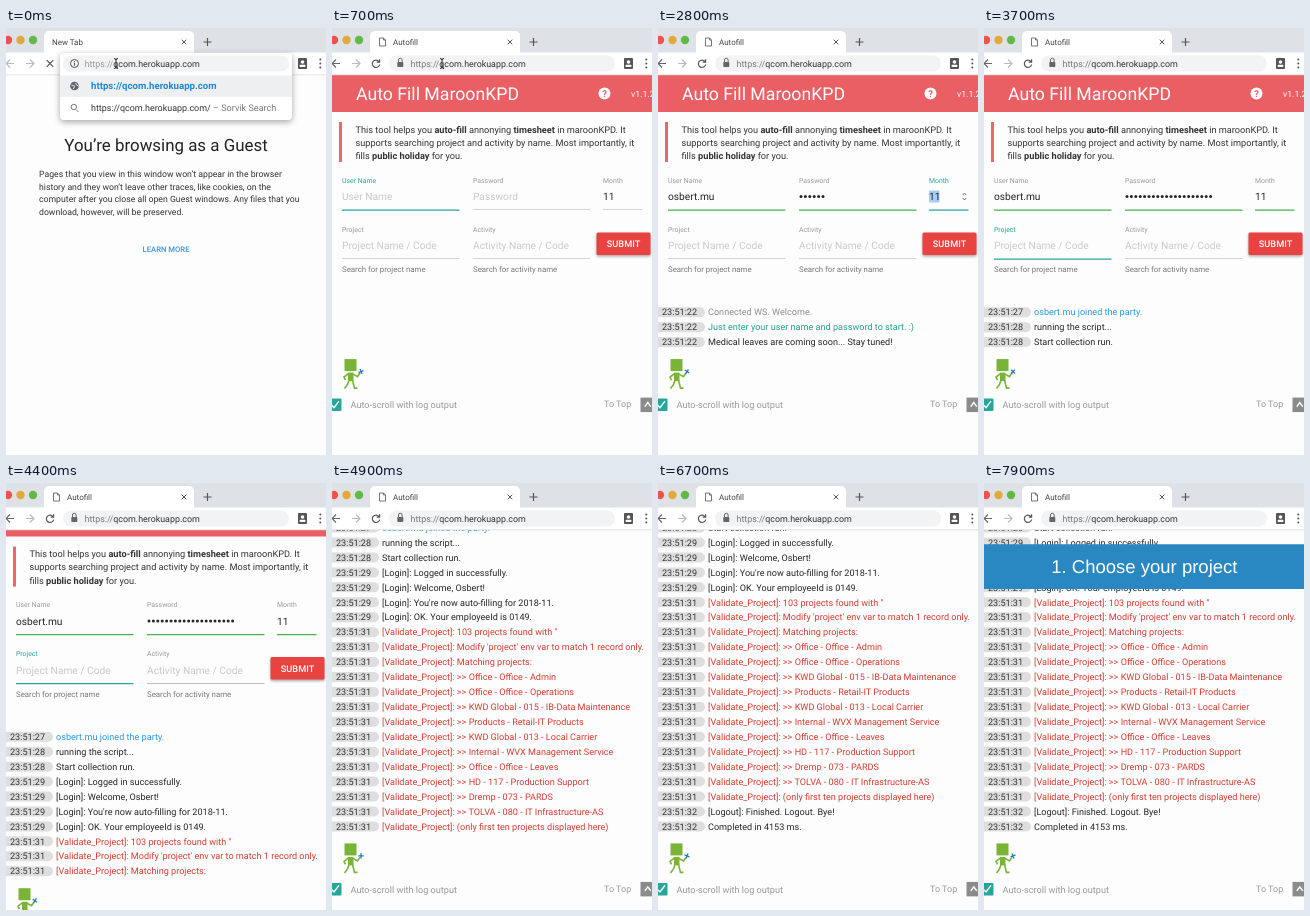
These frames come from a looping animation (320 px wide and 427 px high, 8000 ms). An HTML page with a canvas:

```html
<!DOCTYPE html>
<html lang="en">
<head>
<meta charset="utf-8">
<title>Autofill</title>
<style>
html, body { margin: 0; width: 100%; height: 100%; overflow: hidden; background: #fdfdfd; }
canvas { display: block; width: 100vw; height: 100vh; }
</style>
</head>
<body>
<canvas id="stage"></canvas>
<script>
const W = 320, H = 427, LOOP = 8000;
const LINE = 14.94, FIRST = 284.2, BOTTOM = 343.4;
const TEAL = '#26a69a', GREEN = '#4caf50', RED = '#d63a30', INK = '#262626', GRAY = '#999', BLUE = '#2a98dc';
const URL_HOST = 'qcom.herokuapp.com', USER = 'osbert.mu';

// Key moments, in ms
const CLOSE_MENU = 250, LOAD = 700, CONNECT = 1000, HIDE_MOUSE = 1500, TYPE_USER = 1500,
  FOCUS_PASS = 2100, FOCUS_MONTH = 2700, SUBMIT = 3100, JOIN = 3200, BANNER = 6700;

const welcome = [
  ['22', '#8e8e8e', 'Connected WS. Welcome.'],
  ['22', '#26a08a', 'Just enter your user name and password to start. :)'],
  ['22', INK, 'Medical leaves are coming soon... Stay tuned!']
];
const check = (time, text) => [time, '31', RED, '[Validate_Project]: ' + text];
const login = (time, text) => [time, '29', INK, '[Login]: ' + text];
const log = [
  [JOIN, '27', BLUE, USER + ' joined the party.'],
  [3400, '28', INK, 'running the script...'],
  [3500, '28', INK, 'Start collection run.'],
  login(3900, 'Logged in successfully.'),
  login(3950, 'Welcome, Osbert!'),
  login(4000, "You're now auto-filling for 2018-11."),
  login(4050, 'OK. Your employeeId is 0149.'),
  check(4400, "103 projects found with ''"),
  check(4400, "Modify 'project' env var to match 1 record only."),
  check(4400, 'Matching projects:'),
  ...['Office - Office - Admin', 'Office - Office - Operations', 'KWD Global - 015 - IB-Data Maintenance',
    'Products - Retail-IT Products', 'KWD Global - 013 - Local Carrier', 'Internal - WVX Management Service',
    'Office - Office - Leaves', 'HD - 117 - Production Support', 'Dremp - 073 - PARDS',
    'TOLVA - 080 - IT Infrastructure-AS'].map((p, i) => check(4420 + i * 15, '>> ' + p)),
  check(4580, '(only first ten projects displayed here)'),
  [5500, '32', INK, '[Logout]: Finished. Logout. Bye!'],
  [5500, '32', INK, 'Completed in 4153 ms.']
];

const canvas = document.getElementById('stage'), c = canvas.getContext('2d');
const clamp = v => Math.max(0, Math.min(1, v));
const ease = v => { v = clamp(v); return v * v * (3 - 2 * v); };

function text(s, x, y, size, color, weight = 400, align = 'left', family = 'Roboto') {
  c.font = `${weight} ${size}px ${family}, sans-serif`;
  c.fillStyle = color;
  c.textAlign = align;
  c.fillText(s, x, y);
  return x + c.measureText(s).width;
}
// Text with **bold** runs
function rich(s, x, y, size, color) {
  s.split('**').forEach((part, i) => { x = text(part, x, y, size, color, i % 2 ? 700 : 400); });
}
function rect(x, y, w, h, color, r = 0) {
  c.fillStyle = color;
  c.beginPath();
  c.roundRect(x, y, w, h, r);
  c.fill();
}
function disc(x, y, r, color) {
  c.fillStyle = color;
  c.beginPath();
  c.arc(x, y, r, 0, 7);
  c.fill();
}
function path(d, color, width = 1.2, x = 0, y = 0) {
  c.save();
  c.translate(x, y);
  c.strokeStyle = color;
  c.lineWidth = width;
  c.stroke(new Path2D(d));
  c.restore();
}
function shadow(blur, y, draw) {
  c.save();
  c.shadowColor = 'rgba(0,0,0,.35)';
  c.shadowBlur = blur * canvas.width / W;
  c.shadowOffsetY = y * canvas.height / H;
  draw();
  c.restore();
}

function drawTabs(loaded) {
  rect(0, 0, W, 25, '#dee1e6');
  rect(38, 3, 150, 30, '#fff', 5);
  rect(0, 24.5, W, 22.5, '#fff');
  [['#e9544e', 2], ['#e0ab3c', 14.5], ['#62b946', 27]].forEach(([color, x]) => disc(x, 12, 4.2, color));
  if (loaded) path('M-3-4H1L3-2V4H-3ZM1-4V-2H3', '#666', 0.9, 50.5, 14);
  text(loaded ? 'Autofill' : 'New Tab', loaded ? 61 : 46, 17, 8, '#444');
  path('M-2.3-2.3L2.3 2.3M2.3-2.3L-2.3 2.3', '#555', 1, 178, 14);
  path('M-4 0H4M0-4V4', '#555', 1.2, 201.5, 14);
  path('M4 0H-4M0-4L-4 0L0 4', loaded ? '#666' : '#bbb', 1.2, 4, 35.5);
  path('M-4 0H4M0-4L4 0L0 4', '#bbb', 1.2, 24, 35.5);
  if (loaded) {
    path('M3 -2A3.7 3.7 0 1 0 3.7 1M3.6-4.3V-1.4H.7', '#555', 1.2, 44, 35.5);
  } else {
    path('M-3.3-3.3L3.3 3.3M3.3-3.3L-3.3 3.3', '#555', 1.2, 44, 35.5);
  }
  rect(292, 30, 9, 11, '#555', 1);
  disc(296.5, 34, 1.8, '#fff');
  rect(293.5, 36.8, 6, 2.2, '#fff', 1);
  [31.5, 35.5, 39.5].forEach(y => disc(314.3, y, 1, '#555'));
}

function drawAddress(loaded, menu) {
  if (menu) {
    shadow(6, 2, () => rect(54, 25, 232, 67, '#fff', 4));
    rect(54, 47.5, 232, 21.5, '#eeeff0');
    disc(68.5, 58, 4.3, '#5f6368');
    path('M-3-1L0 0L-1 3M1-3L2-1L4 0', '#eee', 1, 68.5, 58);
    text('https://' + URL_HOST, 85, 61.2, 9.65, '#1f87d2', 700);
    path('M1.5 1.5L4 4M2-1A2.7 2.7 0 1 1-3.4-1A2.7 2.7 0 1 1 2-1', '#777', 1, 68.5, 80);
    const x = text('https://' + URL_HOST + '/', 85, 83, 8.95, '#333');
    text(' – Sorvik Search', x, 83, 9.1, '#777');
  }
  rect(57, 27.5, 226, 16, '#f1f3f4', 8);
  if (loaded) {
    rect(65.3, 34, 6, 5, '#666', 0.7);
    path('M-1.8 0V-2A1.8 1.8 0 0 1 1.8-2V0', '#666', 1, 68.3, 34);
  } else {
    path('M4 0A4 4 0 1 1-4 0A4 4 0 1 1 4 0M0-.7V2.2M0-2.3V-1.3', '#555', 1, 68.5, 35.5);
  }
  const x = text('https://', 78.5, 38.7, 8.9, loaded ? '#777' : '#999');
  text(URL_HOST, x, 38.7, 8.9, '#333');
}

function drawGuest() {
  text('You’re browsing as a Guest', 160, 123, 16.9, '#222', 400, 'center');
  ['Pages that you view in this window won’t appear in the browser',
    'history and they won’t leave other traces, like cookies, on the',
    'computer after you close all open Guest windows. Any files that you',
    'download, however, will be preserved.'
  ].forEach((s, i) => text(s, 33, 149.3 + i * 12.5, 8.7, '#333'));
  text('LEARN MORE', 160, 224, 7.7, '#3c93d6', 500, 'center');
}

function drawField(x, y, w, label, value, hint, state) {
  const focus = state === 'focus';
  text(label, x, y - 27.5, 6.9, focus ? TEAL : GRAY);
  text(value || hint, x, y - 10, 10.2, value ? INK : '#c9c9c9');
  const color = focus ? TEAL : state === 'valid' ? GREEN : '#aaa';
  rect(x, y - 0.6, w, state ? 1.4 : 0.7, color);
}

function drawForm(t) {
  rect(0, 47, W, 37, '#ea5f63');
  text('Auto Fill MaroonKPD', 24, 71.5, 17.7, '#fff');
  disc(272.5, 65.5, 6, '#fff');
  text('?', 272.5, 69, 9.5, '#ea5f63', 700, 'center');
  text('v1.1.2', 299, 69, 8.7, '#fff');

  rect(7, 94, 3, 40, '#e8686b');
  ['This tool helps you **auto-fill** annonying **timesheet** in maroonKPD. It',
    'supports searching project and activity by name. Most importantly, it',
    'fills **public holiday** for you.'
  ].forEach((s, i) => rich(s, 23.5, 104.5 + i * 13.3, 9.2, '#333'));

  const focus = t < FOCUS_PASS ? 0 : t < FOCUS_MONTH ? 1 : t < SUBMIT ? 2 : 3;
  const state = i => focus === i ? 'focus' : focus > i ? 'valid' : '';
  const typed = Math.floor(Math.max(0, t - TYPE_USER) / 60);
  const dots = t >= SUBMIT ? 20 : Math.floor(6 * clamp((t - FOCUS_PASS) / 480));
  drawField(10, 182, 117.5, 'User Name', USER.slice(0, typed), 'User Name', state(0));
  drawField(141, 182, 117.5, 'Password', '', dots ? '' : 'Password', state(1));
  for (let i = 0; i < dots; i++) disc(143 + i * 4.4, 168.5, 1.5, INK);
  if (focus === 2) {
    rect(271, 162.5, 10.5, 12, '#a9cdf2');
    path('M-1.7-1.5L0-3.5L1.7-1.5M-1.7 1.5L0 3.5L1.7 1.5', '#777', 1, 306.5, 168.5);
  }
  drawField(271, 182, 39.5, 'Month', '11', '', state(2));
  drawField(10, 231, 117.5, 'Project', '', 'Project Name / Code', state(3));
  drawField(141, 231, 117.5, 'Activity', '', 'Activity Name / Code', '');
  text('Search for project name', 10, 244, 7.85, '#777');
  text('Search for activity name', 141, 244, 7.85, '#777');
  shadow(3, 1.5, () => rect(264.5, 204.5, 54, 22.5, '#e84341', 1.5));
  text('SUBMIT', 291.5, 219, 9.2, '#fff', 500, 'center');
}

function drawLine([stamp, color, s], y) {
  rect(-8, y - 5, 55, 10, '#dedede', 5);
  text('23:51:' + stamp, 4, y + 3.2, 9.1, '#333');
  text(s, 50, y + 3.2, 9.1, color);
}

function drawFooter(t, y) {
  c.save();
  c.translate(0, y);
  const green = '#7ab436';
  rect(12.5, 17, 12, 12, green);
  rect(16, 30.5, 5.5, 8.5, green);
  path('M16.5 31.5L12 35L13.5 38M21 32L25.5 34.5L28 31M17 38L15.5 42.5L12.5 46.5M20.5 38L22.5 46H25.5', green, 1.6);
  c.translate(29, 29.5);
  c.rotate((t - 500) / 800 * Math.PI / 2);
  path('M-1.9-1.9L1.9 1.9M1.9-1.9L-1.9 1.9', '#2379bd', 1.3);
  c.restore();

  const mid = y + 62.5;
  rect(-3, mid - 6, 12.5, 12.5, TEAL, 1);
  path('M-1 0L2 3L7-3.5', '#fff', 1.4, 0, mid);
  text('Auto-scroll with log output', 18.5, mid + 3.8, 9.15, GRAY);
  text('To Top', 272, mid + 2.8, 9, GRAY);
  rect(308.5, mid - 7, 14, 14.5, '#8b8b8b');
  path('M-3 2L0-2L3 2', '#fff', 1.5, 315.8, mid);
}

function drawPage(t) {
  const lines = t < JOIN ? (t < CONNECT ? [] : welcome) : log.filter(l => t >= l[0]).map(l => l.slice(1));
  const last = FIRST + (Math.max(3, lines.length) - 1) * LINE;
  const shown = t < JOIN ? 3 : log.reduce((n, l) => n + ease((t - l[0]) / 200), 0);
  const scroll = Math.max(0, FIRST + (shown - 1) * LINE - BOTTOM);
  c.save();
  c.beginPath();
  c.rect(0, 47, W, H);
  c.clip();
  c.translate(0, -scroll);
  drawForm(t);
  lines.forEach((line, i) => drawLine(line, FIRST + i * LINE));
  drawFooter(t, last);
  c.restore();
}

function drawBanner(t) {
  c.save();
  c.globalAlpha = ease((t - BANNER) / 400);
  rect(0, 61.3, W, 44.7, '#2988c2');
  text('1. Choose your project', 67.3, 90, 18.5, '#fff', 400, 'left', 'Liberation Sans');
  c.restore();
}

function draw(t) {
  const dpr = window.devicePixelRatio || 1;
  const w = Math.round(innerWidth * dpr), h = Math.round(innerHeight * dpr);
  if (canvas.width !== w || canvas.height !== h) {
    canvas.width = w;
    canvas.height = h;
  }
  c.setTransform(w / W, 0, 0, h / H, 0, 0);
  c.textRendering = 'geometricPrecision';
  rect(0, 0, W, H, '#fdfdfd');
  const loaded = t >= LOAD;
  if (loaded) drawPage(t); else drawGuest();
  drawTabs(loaded);
  rect(0, 46.5, W, 0.7, '#d5d5d5');
  drawAddress(loaded, t < CLOSE_MENU);
  if (t < HIDE_MOUSE) path('M-2-5Q0-5 0-3.5Q0-5 2-5M0-4V4M-2 5Q0 5 0 3.5Q0 5 2 5', '#222', 1, 110, 35.5);
  if (t > BANNER) drawBanner(t);
}

const start = performance.now();
function frame() {
  draw((performance.now() - start) % LOOP);
  requestAnimationFrame(frame);
}
frame();
</script>
</body>
</html>
```
